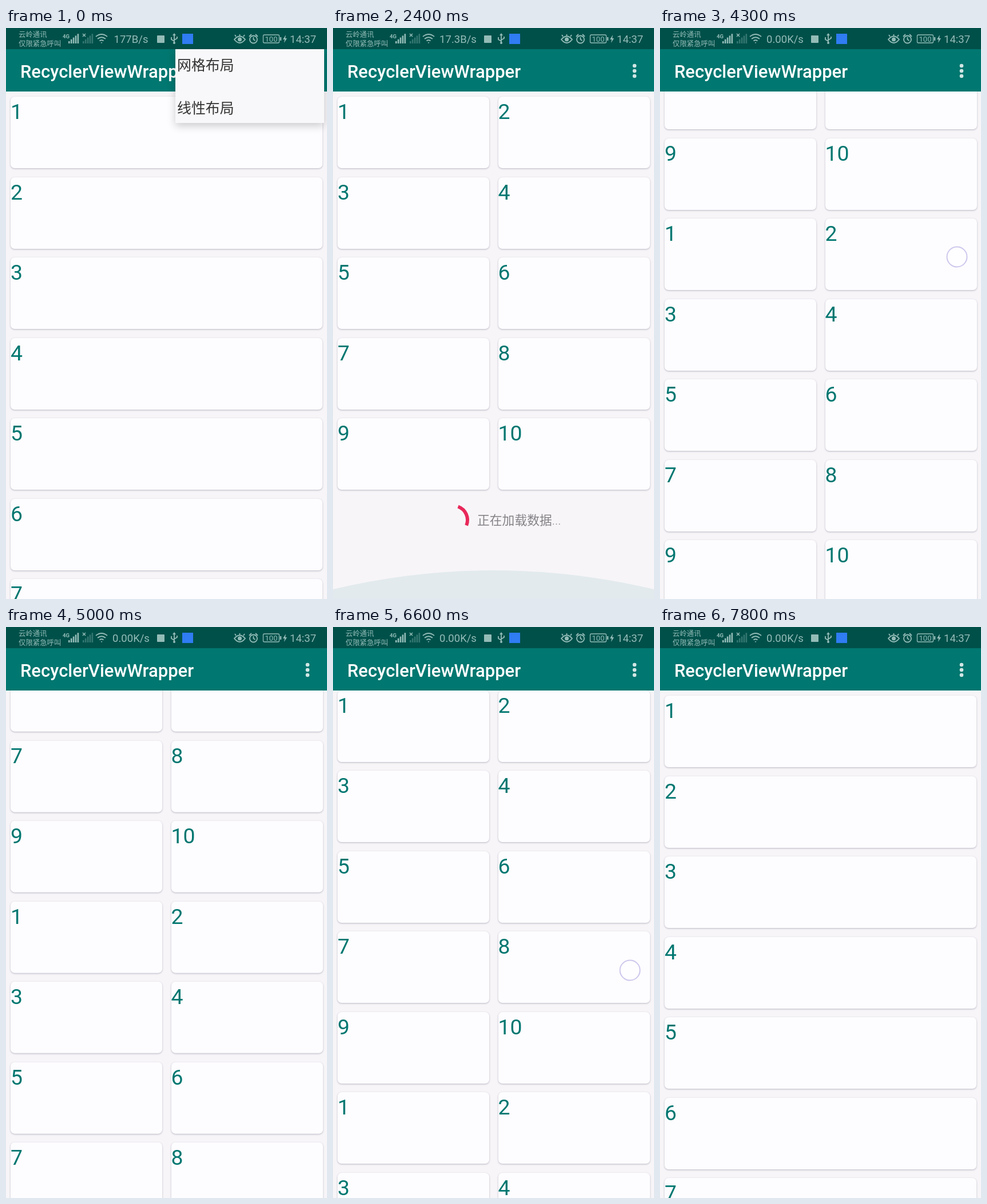
Recreate the animation shown at these times as an HTML page. Size 561 by 998 pixels, loop 7900 ms.

```html
<!DOCTYPE html>
<html lang="zh">
<head>
<meta charset="utf-8">
<title>RecyclerViewWrapper</title>
<style>
html, body { margin: 0; width: 100%; height: 100%; overflow: hidden; }
body { font-family: Roboto, "Noto Sans CJK SC", "Noto Sans CJK", sans-serif; }
#stage { position: relative; width: 561px; height: 998px; overflow: hidden; background: #f7f5f8; }
#view { position: absolute; top: 111px; left: 0; width: 561px; height: 887px; overflow: hidden; }
.list { position: absolute; top: 1px; left: 0; width: 561px; }
.card {
  position: absolute; box-sizing: border-box; height: 125px; padding-top: 4px;
  border-radius: 7px; background: #fdfcff; color: #007770;
  font-size: 37.4px; line-height: 44px;
  box-shadow: 0 1px 3px rgba(40, 40, 70, .3);
}
.foot { position: absolute; left: 0; width: 561px; height: 100px; }
.foot svg { position: absolute; left: 0; top: 0; }
.foot span { position: absolute; white-space: nowrap; font-size: 21.8px; line-height: 30px; font-weight: 300; }
#loadText { left: 252px; top: 31px; color: #858387; }
#endText { left: 204px; top: 1px; color: #a19fa6; }
#glow, #bar, #touch { position: absolute; left: 0; top: 0; }
#menu {
  position: absolute; left: 296px; top: 37px; width: 260px; height: 129px; overflow: hidden;
  background: #f8f7f9; box-shadow: 0 5px 14px rgba(0, 0, 0, .2);
}
#menu span { position: absolute; left: 3px; font-size: 24.9px; line-height: 36px; color: #333; font-weight: 300; }
#ripple { position: absolute; left: 0; width: 260px; height: 64px; background: #000; }
</style>
</head>
<body>
<div id="stage">
  <div id="view">
    <div class="list" id="grid">
      <div class="foot" id="loading">
        <svg width="561" height="100"><path id="arc" fill="none" stroke="#e8285a" stroke-width="6"/></svg>
        <span id="loadText">正在加载数据...</span>
      </div>
      <div class="foot" id="ending">
        <svg width="561" height="40"><path d="M31 15H197M364 15H530" stroke="#a6a4ac" stroke-width="3"/></svg>
        <span id="endText">我也是有底线的</span>
      </div>
    </div>
    <div class="list" id="linear"></div>
  </div>
  <svg id="glow" width="561" height="998"><path fill="#007778" fill-opacity=".085"/></svg>
  <svg id="bar" width="561" height="111">
    <rect width="561" height="111" fill="#007770"/>
    <rect width="561" height="37" fill="#00504a"/>
    <g fill="#94bcb7">
      <g font-size="12.4" font-weight="300">
        <text x="22" y="16">云岭通讯</text><text x="22" y="32">仅限紧急呼叫</text>
      </g>
      <text x="99" y="18" font-size="9.5" font-weight="700">4G</text>
      <g id="signal"></g>
      <path d="M134 10l5 5M139 10l-5 5" stroke="#94bcb7" stroke-width="1.5"/>
      <g fill="none" stroke="#94bcb7" stroke-width="1.8">
        <path d="M157 15q10-8 20 0M160 19q7-5.5 14 0M163.500 22.500q3.500-2.500 7 0"/>
        <path d="M294 26V11M289 16v4l5 3M299 15v3l-5 3"/>
        <path d="M399 20q9.500-11 19 0q-9.500 12-19 0zM408.500 14v-3M402 15l-2-3M415 15l2-3"/>
        <circle cx="432.500" cy="20" r="6.500"/>
        <path d="M432.500 16v4l3 2M425 15l4-4M436 11l4 4"/>
        <rect x="449.500" y="12" width="28" height="14" rx="2" stroke-width="1.300"/>
        <path d="M480 16v6" stroke-width="2.500"/>
      </g>
      <path d="M165.500 25h3l-1.500 2zM294 9l3 4h-6zM489 12l-5 8h3l-1 6 5-8h-3z"/>
      <circle cx="294" cy="26" r="2"/><circle cx="408.500" cy="20" r="3.500"/>
      <rect x="264" y="13" width="13" height="13" rx="1"/>
      <g font-size="18.5">
        <text id="speed" x="218.500" y="26" text-anchor="middle"></text>
        <text x="496" y="26">14:37</text>
      </g>
      <text x="463.500" y="24" font-size="13" text-anchor="middle">100</text>
    </g>
    <rect x="308" y="10" width="19" height="18" fill="#2f7cf3"/>
    <text x="25" y="87" font-size="31" font-weight="500" fill="#fff">RecyclerViewWrapper</text>
    <g fill="#d0e6e4">
      <circle cx="527" cy="66" r="3.300"/><circle cx="527" cy="75" r="3.300"/><circle cx="527" cy="84" r="3.300"/>
    </g>
  </svg>
  <div id="menu">
    <div id="ripple"></div>
    <span style="top:11px">网格布局</span><span style="top:86px">线性布局</span>
  </div>
  <svg id="touch" width="561" height="998">
    <circle cx="519" r="17.500" fill="#fff" fill-opacity=".6" stroke="#cdc8ec" stroke-width="2"/>
  </svg>
</div>
<script>
const LOOP = 7900, STEP = 100, ROW = 140.5, PAGE = 5 * ROW, LAST_PAGE = 4;
const TO_FOOTER = 609.5, TO_END = 641.5, LIFT = 300;
const $ = id => document.getElementById(id);

const swipes = [
  { start: 1800, time: 400, by: 0 },
  { start: 2600, time: 800, by: TO_FOOTER },
  { start: 4000, time: 674, by: PAGE },
  { start: 4650, time: 1107, by: TO_END },
  { start: 6400, time: 700, by: -(TO_FOOTER + PAGE + TO_END) }
];

const clamp = (v, lo = 0, hi = 1) => Math.min(hi, Math.max(lo, v));
const ramp = (t, start, time) => clamp((t - start) / time);
const fling = (t, start, time) => 1 - (1 - ramp(t, start, time)) ** 3;
const hump = (t, peak, reach) => Math.cos(clamp((t - peak) / reach, -1, 1) * Math.PI / 2) ** 2;
const show = (el, on) => { el.style.display = on ? '' : 'none'; };

function addCard(list, index, columns) {
  const card = document.createElement('div');
  card.className = 'card';
  card.textContent = index % 10 + 1;
  card.style.left = 8 + index % columns * 280.5 + 'px';
  card.style.top = 8 + Math.floor(index / columns) * ROW + 'px';
  card.style.width = (columns === 2 ? 265 : 545) + 'px';
  list.append(card);
  return card;
}

const cards = Array.from({ length: LAST_PAGE * 10 }, (_, i) => addCard($('grid'), i, 2));
for (let i = 0; i < 10; i++) addCard($('linear'), i, 1);

let bars = '';
for (let i = 0; i < 10; i++) {
  const n = i % 5, h = 4 + n * 3.2, x = (i < 5 ? 109 : 134) + n * 3.9;
  bars += `<rect x="${x}" y="${27 - h}" width="2.6" height="${h}" opacity="${i < 5 ? 1 : .35}"/>`;
}
$('signal').innerHTML = bars;

function drawSpinner(t) {
  const start = -70 + (t - 2400) * .54;
  const sweep = 92 + 60 * Math.sin((t - 2400) / 200);
  const point = deg => {
    const a = deg * Math.PI / 180;
    return `${210 + 25 * Math.cos(a)} ${45 + 25 * Math.sin(a)}`;
  };
  $('arc').setAttribute('d', `M${point(start)}A25 25 0 0 1 ${point(start + sweep)}`);
}

function glowPath(edge, depth) {
  const side = edge + depth * .34;
  return `M0 ${edge}V${side}Q280.5 ${edge + depth * 1.66} 561 ${side}V${edge}Z`;
}

function drawTouch(t) {
  const swipe = swipes.find(s => t >= s.start && t <= s.start + LIFT);
  show($('touch'), swipe);
  if (!swipe) return;
  const moved = t - swipe.start;
  $('touch').firstElementChild.setAttribute('cy', swipe.by < 0 ? 400 + moved : 700 - moved);
}

function drawMenu(t) {
  const open = 1 - ramp(t, 800, 300) + ramp(t, 7300, 100) - ramp(t, 7600, 100);
  show($('menu'), open > 0);
  $('menu').style.opacity = open;
  const first = t < LOOP / 2;
  $('ripple').style.opacity = .1 * hump(t, first ? 800 : 7600, 300);
  $('ripple').style.top = first ? '0' : '65px';
}

function render(t) {
  const isGrid = t >= 1000 && t < 7600;
  show($('grid'), isGrid);
  show($('linear'), !isGrid);

  // one more page arrives every second
  const pages = clamp(Math.floor((t - 600) / 1000), 1, LAST_PAGE);
  const scroll = swipes.reduce((sum, s) => sum + s.by * fling(t, s.start, s.time), 0);
  cards.forEach((card, i) => show(card, i < pages * 10));
  $('grid').style.transform = `translateY(${-scroll}px)`;

  const ended = pages === LAST_PAGE;
  show($('loading'), t >= 1800 && !ended);
  show($('ending'), ended);
  $('loading').style.top = $('ending').style.top = pages * PAGE + 'px';
  drawSpinner(t);

  const bottom = 50 * hump(t, 2400, 600) + 11 * hump(t, 5700, 200);
  $('glow').firstElementChild.setAttribute('d',
    glowPath(111, 47 * hump(t, 7100, 300)) + glowPath(998, -bottom));

  drawMenu(t);
  drawTouch(t);
  $('speed').textContent = t < 1200 ? '177B/s' : t < 3000 ? '17.3B/s' : '0.00K/s';
}

const begin = performance.now();
function tick() {
  const t = (performance.now() - begin) % LOOP;
  render(Math.floor(t / STEP) * STEP);
  requestAnimationFrame(tick);
}
tick();
</script>
</body>
</html>
```
